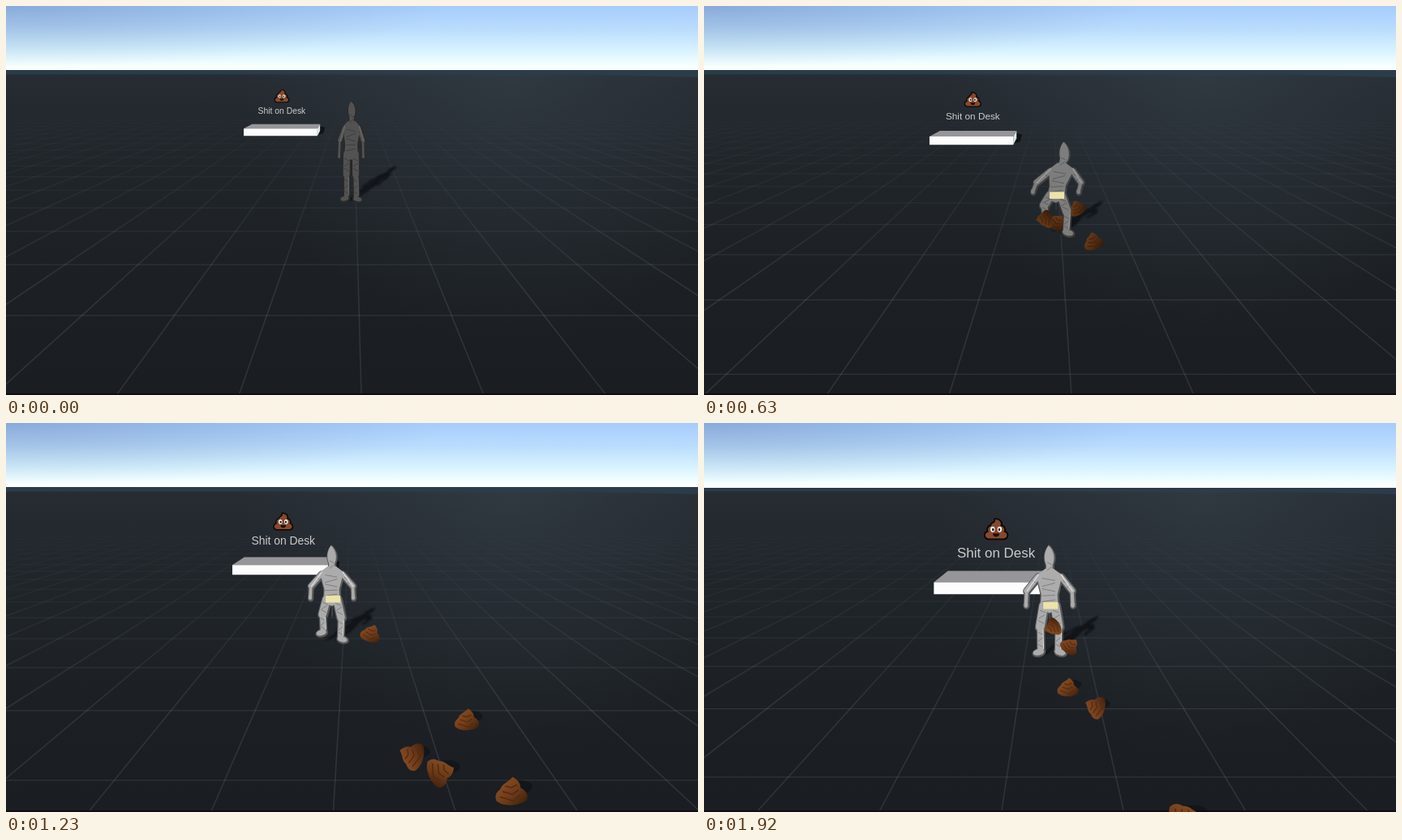
An HTML page with a canvas that plays this animation: 853x480 px, repeating every 2.02 s.

```html
<!DOCTYPE html>
<html lang="en">
<head>
<meta charset="utf-8">
<title>Shit on Desk</title>
<style>
html, body { margin: 0; width: 100%; height: 100%; overflow: hidden; background: #1b1e22; }
canvas { display: block; width: 853px; height: 480px; }
</style>
</head>
<body>
<canvas id="stage" width="853" height="480"></canvas>
<script>
const c = document.getElementById('stage').getContext('2d');
const W = 853, H = 480;
// ground perspective: one world unit is UNIT / depth pixels wide
const HORIZON = 80, VX = 427, UNIT = 435, EYE = 1153;

// key points of the smooth paths, in world units
const TIMES = [0, 300, 630, 990, 1440, 1650, 1920];
const DESK_DEPTH = [14.37, 12.95, 12.63, 11.58, 9.98, 9.19, 8.78];
const SHIFT = [.073, .126, .172, .47, 1.186, 1.415, 1.6];
const WALK_X = [-.09, -.256, -.08, -.74, -1.54, -1.66, -1.61];
const WALK_D = [7.21, 7.3, 6.95, 5.68, 3.84, 3.34, 3.19];
const CROUCH = [0, .2, .75, 0, 1, .35, .42];

// birth time and landing place of each lump
const DROPS = [
  [230, .54, 7.67], [300, -.02, 7.45], [290, -.26, 7.26], [300, .46, 6.72], [960, -.52, 5.95],
  [1350, -1.06, 4.52], [1350, -1.37, 4.1], [1600, -1.2, 3.63], [1660, -1.5, 3.5]
];

const mix = (a, b, u) => a + (b - a) * u;
const between = (p, q, u) => [mix(p[0], q[0], u), mix(p[1], q[1], u)];
const clamp = (v, a = 0, b = 1) => Math.min(b, Math.max(a, v));
const ease = u => (u = clamp(u)) * u * (3 - 2 * u);
const bell = (t, mid, width) => Math.exp(-(((t - mid) / width) ** 2));
const shade = (r, g, b, k = 1) => `rgb(${r * k},${g * k},${b * k})`;

// cubic through the key points
function curve(keys, t) {
  let i = 0;
  while (i < TIMES.length - 2 && t >= TIMES[i + 1]) i++;
  const d = TIMES[i + 1] - TIMES[i], u = (t - TIMES[i]) / d;
  const slope = k => {
    const a = Math.max(0, k - 1), b = Math.min(keys.length - 1, k + 1);
    return (keys[b] - keys[a]) / (TIMES[b] - TIMES[a]) * d;
  };
  const p = keys[i], q = keys[i + 1], m = slope(i), n = slope(i + 1);
  return p + m * u + (3 * (q - p) - 2 * m - n) * u * u + (2 * (p - q) + m + n) * u ** 3;
}

// world x, height and depth from the eye to a screen point
const project = (x, h, depth) => [VX + x * UNIT / depth, HORIZON + (EYE - UNIT * h) / depth];

function stops(g, list) {
  list.forEach(([at, color]) => g.addColorStop(at, color));
  return g;
}
const linear = (x0, y0, x1, y1, ...list) => stops(c.createLinearGradient(x0, y0, x1, y1), list);
const radial = (x, y, r, ...list) => stops(c.createRadialGradient(x, y, 0, x, y, r), list);

function poly(fill, ...pts) {
  c.beginPath();
  pts.forEach(p => c.lineTo(p[0], p[1]));
  c.closePath();
  c.fillStyle = fill;
  c.fill();
}

function oval(x, y, rx, ry, fill, turn = 0) {
  c.beginPath();
  c.ellipse(x, y, rx, ry, turn, 0, 7);
  c.fillStyle = fill;
  c.fill();
}

function limb(color, width, ...pts) {
  c.beginPath();
  pts.forEach(p => c.lineTo(p[0], p[1]));
  c.lineCap = c.lineJoin = 'round';
  c.lineWidth = width;
  c.strokeStyle = color;
  c.stroke();
}

function backdrop(t) {
  const edge = Math.floor(79 + t / 1900);
  c.fillStyle = linear(0, 0, 0, edge, [0, '#a6ccfd'], [.35, '#b9dcfd'], [.7, '#d8f3ff'], [.92, '#f4ffff'], [1, '#fff']);
  c.fillRect(0, 0, W, edge);
  c.save();
  c.scale(1, .14);
  c.fillStyle = radial(0, 0, 540, [0, 'rgba(70,95,140,.3)'], [1, 'rgba(70,95,140,0)']);
  c.fillRect(0, 0, W, 540);
  c.restore();
  c.fillStyle = linear(0, 79, 0, H, [0, '#2c3a45'], [.02, '#262c32'], [.3, '#20252a'], [.65, '#1c2024'], [1, '#1a1d21']);
  c.fillRect(0, edge, W, H);
  c.fillStyle = radial(620, 85, 330, [0, 'rgba(85,105,120,.21)'], [1, 'rgba(85,105,120,0)']);
  c.fillRect(0, edge, W, 340);
  poly('#2b3c4a', [0, edge], [W, edge], [W, 88], [690, 84], [0, 84]);
}

function grid(z, shift) {
  c.strokeStyle = linear(0, 125, 0, 360, [0, 'rgba(210,220,225,0)'], [.5, 'rgba(210,220,225,.05)'], [1, 'rgba(210,220,225,.11)']);
  c.lineWidth = 1.6;
  c.beginPath();
  for (let n = -35; n < 35; n++) {
    const x = (n + shift) * UNIT / EYE;
    c.moveTo(VX + x * 45, 125);
    c.lineTo(VX + x * 400, H);
  }
  c.stroke();
  c.lineWidth = 1.3;
  c.beginPath();
  for (let d = (z + .45) % 1 + 2; d < 20; d++) {
    const y = HORIZON + EYE / d;
    c.moveTo(0, y);
    c.lineTo(W, y);
  }
  c.stroke();
  c.fillStyle = '#150b15';
  c.fillRect(0, 478, W, 2);
}

function icon(x, y, w) {
  c.save();
  c.translate(x, y);
  c.scale(w / 28, w / 28);
  c.beginPath();
  c.moveTo(-1, -12);
  c.bezierCurveTo(5, -12, 7, -7, 5, -4);
  c.bezierCurveTo(10, -4, 11, 1, 9, 3);
  c.bezierCurveTo(15, 4, 14, 11, 9, 11);
  c.lineTo(-9, 11);
  c.bezierCurveTo(-14, 11, -15, 4, -9, 3);
  c.bezierCurveTo(-11, 0, -9, -4, -6, -4);
  c.bezierCurveTo(-6, -8, 0, -7, -1, -12);
  c.lineJoin = 'round';
  c.lineWidth = 3.6;
  c.strokeStyle = '#090706';
  c.stroke();
  c.fillStyle = '#86492b';
  c.fill();
  for (const s of [-4.2, 4.2]) {
    oval(s, 0, 2.7, 3.4, '#f4f4f4');
    oval(s * .9, .3, 1.2, 1.8, '#111');
  }
  c.beginPath();
  c.arc(0, 5, 4, 0, Math.PI);
  c.fillStyle = '#1b0d08';
  c.fill();
  c.restore();
}

function desk(z, shift) {
  const at = (x, h, d) => project(x + shift, h, d);
  const back = z + 1.2, L = -4.5, R = -1.5;
  poly('rgba(8,10,12,.7)', at(R, 0, z + .3), at(R + .2, 0, z + .5), at(R + .22, .15, back), at(R, .2, back));
  poly('#d9e6e8', at(R, .3, z), at(R, .3, back), at(R, 0, back), at(R, 0, z));
  poly('#969599', at(L, .3, z), at(L, .3, back), at(R, .3, back), at(R, .3, z));
  poly('#fcfcfd', at(L, .3, z), at(R, .3, z), at(R, 0, z), at(L, 0, z));
  const x = VX + (shift - 2.95) * UNIT / z;
  c.font = `${149 / z}px "Liberation Sans", Arial, sans-serif`;
  c.textAlign = 'center';
  c.textBaseline = 'alphabetic';
  c.fillStyle = '#cbcbcb';
  c.fillText('Shit on Desk', x, HORIZON + 757 / z);
  icon(x, HORIZON + 450 / z, 250 / z);
}

// where the walker stands and how high the hip is
function stand(t) {
  const crouch = curve(CROUCH, t);
  return { x: curve(WALK_X, t), d: curve(WALK_D, t), crouch, h: .95 - .42 * crouch };
}

// the walker's joints on screen
function pose(t, z, shift) {
  const { x, d, crouch, h } = stand(t), depth = z - d;
  const [gx, gy] = project(x + shift, 0, depth), unit = UNIT / depth;
  const side = bell(t, 300, 170), back = ease((t - 300) / 330);
  const lean = .2 * Math.sin((t - 440) / 115) * bell(t, 450, 300);
  const lift = .28 * bell(t, 800, 450);
  const at = (dx, up) => [gx + dx * unit, gy - up * unit];
  const pair = f => [f(-1), f(1)];
  const hip = at(0, h), head = at(lean, h + .88 - .28 * crouch), neck = between(head, hip, .33);
  const stance = .1 + .09 * crouch - .04 * side;
  const reach = .24 - .11 * side + .12 * back;
  const half = (.2 - .08 * side + .02 * back) * unit;
  const foot = pair(k => at(k * stance, .05 + (k < 0 ? lift : 0)));
  const thigh = pair(k => [hip[0] + k * .09 * unit, hip[1]]);
  return {
    s: unit / 77, half, side, head, neck, hip, foot, thigh,
    shoulder: pair(k => [neck[0] + k * (half - 3), neck[1] + 4]),
    knee: pair((k, i = (k + 1) / 2) => {
      const [a, b] = between(thigh[i], foot[i], .46);
      return [a + k * .08 * crouch * unit - 3 * side, b];
    }),
    elbow: pair(k => [mix(neck[0], hip[0], .5) + k * reach * unit, mix(neck[1], hip[1], .53)]),
    hand: pair(k => at(k * (reach + .01), h - .05 + .15 * crouch))
  };
}

function body(j, color, grow) {
  const { s, half, side, neck, hip, head } = j, g = grow / 2;
  for (const k of [0, 1]) {
    const dir = k * 2 - 1, [fx, fy] = j.foot[k];
    limb(color, 13 * s + grow, j.thigh[k], j.knee[k]);
    limb(color, 9.5 * s + grow, j.knee[k], j.foot[k]);
    oval(fx + mix(dir * 2.5, -5, side) * s, fy + s, 8 * s + g, 5 * s + g, color, dir * .25 * (1 - side));
    limb(color, 9 * s + grow, j.shoulder[k], j.elbow[k]);
    limb(color, 6.5 * s + grow, j.elbow[k], j.hand[k]);
    oval(...j.hand[k], 3.5 * s + g, 4.5 * s + g, color);
  }
  const [wx, wy] = between(neck, hip, .65), collar = neck[1] - 6 * s;
  const edge = k => [
    [neck[0] + k * 5, collar], [neck[0] + k * (half + g), neck[1] + 2],
    [wx + k * (11 * s + g), wy], [hip[0] + k * (12 * s + g), hip[1] + 4]
  ];
  poly(color, ...edge(1), [hip[0], hip[1] + 9 * s], ...edge(-1).reverse());
  limb(color, 10 * s + grow, head, neck);
  const [x, y] = head, r = 7.5 * s + g;
  c.beginPath();
  c.moveTo(x - 1, y - 16 * s - g);
  c.bezierCurveTo(x + r, y - 9 * s, x + r * 1.2, y + 3 * s, x + r * .5, y + 10 * s);
  c.lineTo(x - r * .5, y + 10 * s);
  c.bezierCurveTo(x - r * 1.2, y + 3 * s, x - r, y - 9 * s, x - 1, y - 16 * s - g);
  c.fillStyle = color;
  c.fill();
}

// short creases across a limb
function creases(color, width, count, a, b) {
  for (let i = 1; i <= count; i++) {
    const [x, y] = between(a, b, i / (count + 1)), tilt = Math.sin(i * 2.4) * 2;
    limb(color, .8, [x - width * .45, y - tilt], [x + width * .3, y + tilt]);
  }
}

function walker(j, t) {
  const grey = mix(82, 172, ease(t / 1300)), tone = k => shade(grey, grey, grey, k);
  const { s, head, neck, hip, half } = j;
  const fx = hip[0] + 4, fy = Math.max(j.foot[0][1], j.foot[1][1]);
  c.save();
  c.translate(fx, fy);
  c.transform(.6, -.1, -.44, .34, 0, 0);
  c.translate(-fx, -fy);
  c.filter = 'blur(1.2px)';
  body(j, '#111418', 1);
  c.restore();

  body(j, tone(.52), 1);
  c.save();
  c.translate(-.5, -.6);
  body(j, tone(1), -2.4);
  c.restore();

  const dark = tone(.68), light = tone(1.3);
  creases(dark, half * 1.2, 5, neck, hip);
  creases(dark, 7 * s, 2, head, neck);
  for (const k of [0, 1]) {
    creases(dark, 9 * s, 3, j.thigh[k], j.knee[k]);
    creases(dark, 7 * s, 3, j.knee[k], j.foot[k]);
    creases(dark, 6 * s, 2, j.shoulder[k], j.elbow[k]);
    limb(light, 1, [j.knee[k][0] + 3 * s, j.knee[k][1] + 3], [j.foot[k][0] + 3 * s, j.foot[k][1] - 4]);
    limb(light, 1.2, [j.shoulder[k][0], j.shoulder[k][1] - 3], j.elbow[k]);
  }
  limb(tone(.45), 1.6 * s, [hip[0], hip[1] + 9 * s], between(j.knee[0], j.knee[1], .5));

  const paper = ease((t - 380) / 150);
  c.fillStyle = '#ece3a6';
  c.fillRect(hip[0] + 1 - 9 * paper, hip[1] - 5, 18 * paper, 8.5);
}

function lump(x, y, size, spin, k) {
  c.save();
  c.translate(x, y);
  c.rotate(spin);
  c.scale(size / 24, size / 24);
  c.beginPath();
  c.moveTo(1, -11);
  c.bezierCurveTo(5, -9, 7, -6, 7, -3);
  c.bezierCurveTo(13, 0, 14, 6, 9, 8);
  c.bezierCurveTo(3, 11, -6, 11, -11, 7);
  c.bezierCurveTo(-13, 2, -10, 0, -8, -2);
  c.bezierCurveTo(-7, -6, -2, -7, 1, -11);
  c.fillStyle = linear(-9, -8, 10, 10, [0, shade(140, 79, 35, k)], [.55, shade(108, 58, 24, k)], [1, shade(62, 32, 13, k)]);
  c.fill();
  const fold = shade(82, 43, 18, k);
  for (let i = 0; i < 3; i++) limb(fold, 1, [-4 - 2 * i, 4 * i - 4], [i, 5 * i - 3], [4 + i, 4 * i - 5]);
  c.restore();
}

function drop([born, landX, landD], i, t, z, shift) {
  if (t < born) return;
  const from = stand(born), u = clamp((t - born) / (490 * Math.sqrt(from.h)));
  const depth = z - mix(from.d, landD, u);
  if (depth < 1.8) return;
  const [x, y] = project(mix(from.x, landX, u) + shift, from.h * (1 - u * u), depth);
  const size = .28 * UNIT / depth;
  if (u === 1) oval(x + size * .25, y - size * .15, size * .4, size * .22, 'rgba(8,10,12,.4)');
  lump(x, y, size, Math.sin(i * 2.1) * 1.4 + 2 * (u - 1), clamp(.35 + t / 1500, .4));
}

function draw(t) {
  const z = curve(DESK_DEPTH, t), shift = curve(SHIFT, t);
  backdrop(t);
  grid(z, shift);
  desk(z, shift);
  walker(pose(t, z, shift), t);
  DROPS.forEach((d, i) => drop(d, i, t, z, shift));
}

function frame(now) {
  draw(Math.min(1920, Math.floor(now % 2020 / 30) * 30));
  requestAnimationFrame(frame);
}
requestAnimationFrame(frame);
</script>
</body>
</html>
```
